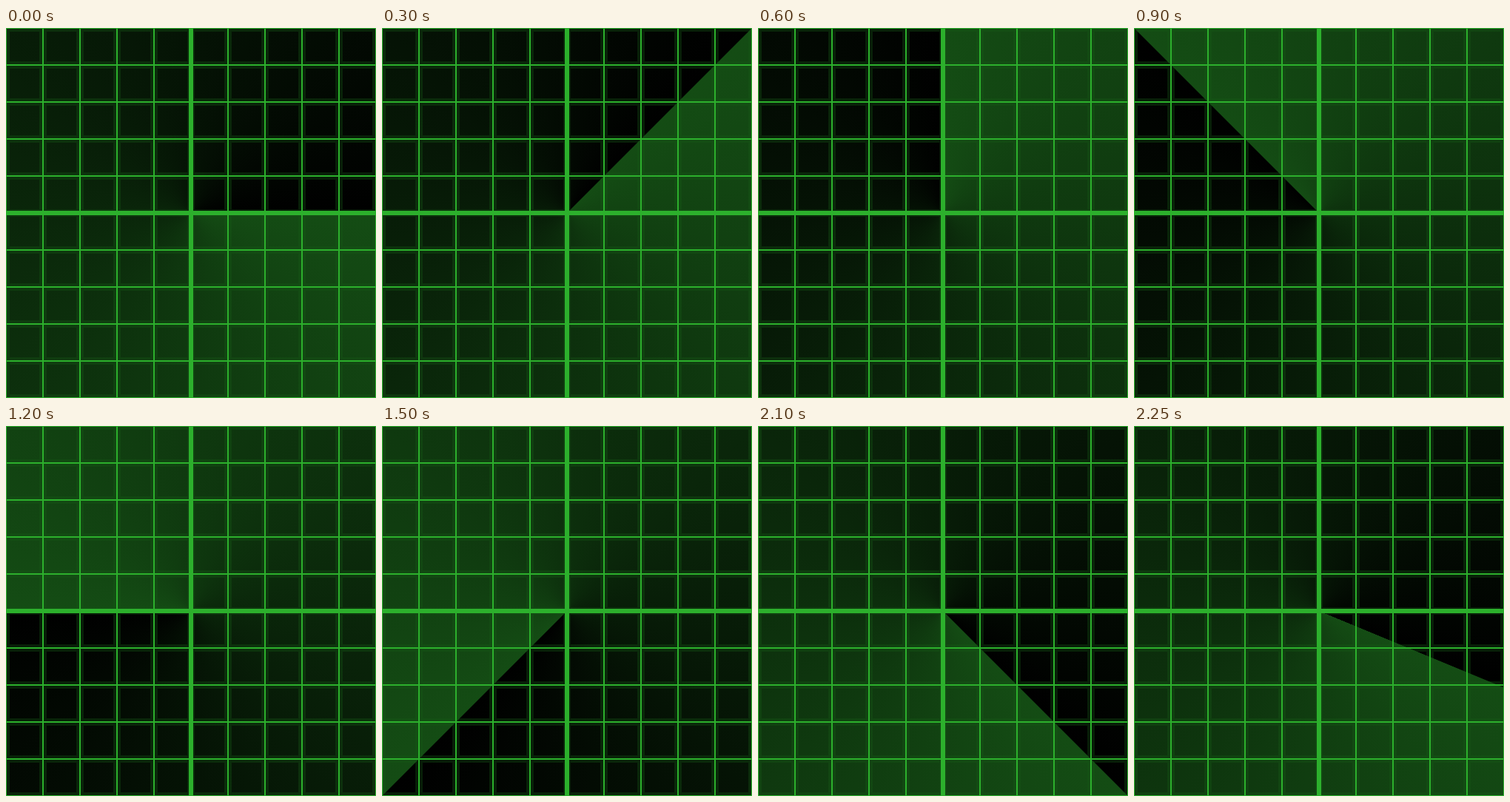
An HTML page with a canvas that plays this animation: 500x500 px, repeating every 2400 ms.

```html
<!DOCTYPE html>
<html lang="en">
<head>
<meta charset="utf-8">
<title>Radar sweep</title>
<style>
  html, body { margin: 0; width: 100%; height: 100%; overflow: hidden; background: #000; }
  canvas { display: block; }
</style>
</head>
<body>
<canvas id="radar" width="500" height="500"></canvas>
<script>
const SIZE = 500, CENTER = SIZE / 2, CELL = 50;
const STEPS = 16, STEP_MS = 150;
const LINE = 'rgb(44,176,44)', GLOW = 'rgba(22,88,22,0.33)';
const SEAM = 0.0003; // softens the leading edge by about a pixel
const ctx = document.getElementById('radar').getContext('2d');

function strokeGrid(color, width) {
  ctx.strokeStyle = color;
  ctx.lineWidth = width;
  ctx.beginPath();
  for (let p = 0; p <= SIZE; p += CELL) {
    ctx.moveTo(p, 0);
    ctx.lineTo(p, SIZE);
    ctx.moveTo(0, p);
    ctx.lineTo(SIZE, p);
  }
  ctx.stroke();
}

function drawSweep(angle) {
  const trail = ctx.createConicGradient(angle, CENTER, CENTER);
  trail.addColorStop(0, 'rgb(10,38,10)');
  trail.addColorStop(SEAM, 'rgb(20,76,20)');
  trail.addColorStop(1 - SEAM, '#000');
  trail.addColorStop(1, 'rgb(10,38,10)');
  ctx.fillStyle = trail;
  ctx.fillRect(0, 0, SIZE, SIZE);
}

function draw(step) {
  // The beam turns counterclockwise and its trail fades over a full turn.
  drawSweep(-step / STEPS * 2 * Math.PI);
  strokeGrid(GLOW, 10);
  strokeGrid(LINE, 2);
  ctx.fillStyle = LINE;
  ctx.fillRect(CENTER - 3, 0, 6, SIZE);
  ctx.fillRect(0, CENTER - 3, SIZE, 6);
}

const start = performance.now();
function tick() {
  const elapsed = performance.now() - start;
  draw(Math.floor(elapsed / STEP_MS) % STEPS);
  requestAnimationFrame(tick);
}
tick();
</script>
</body>
</html>
```
